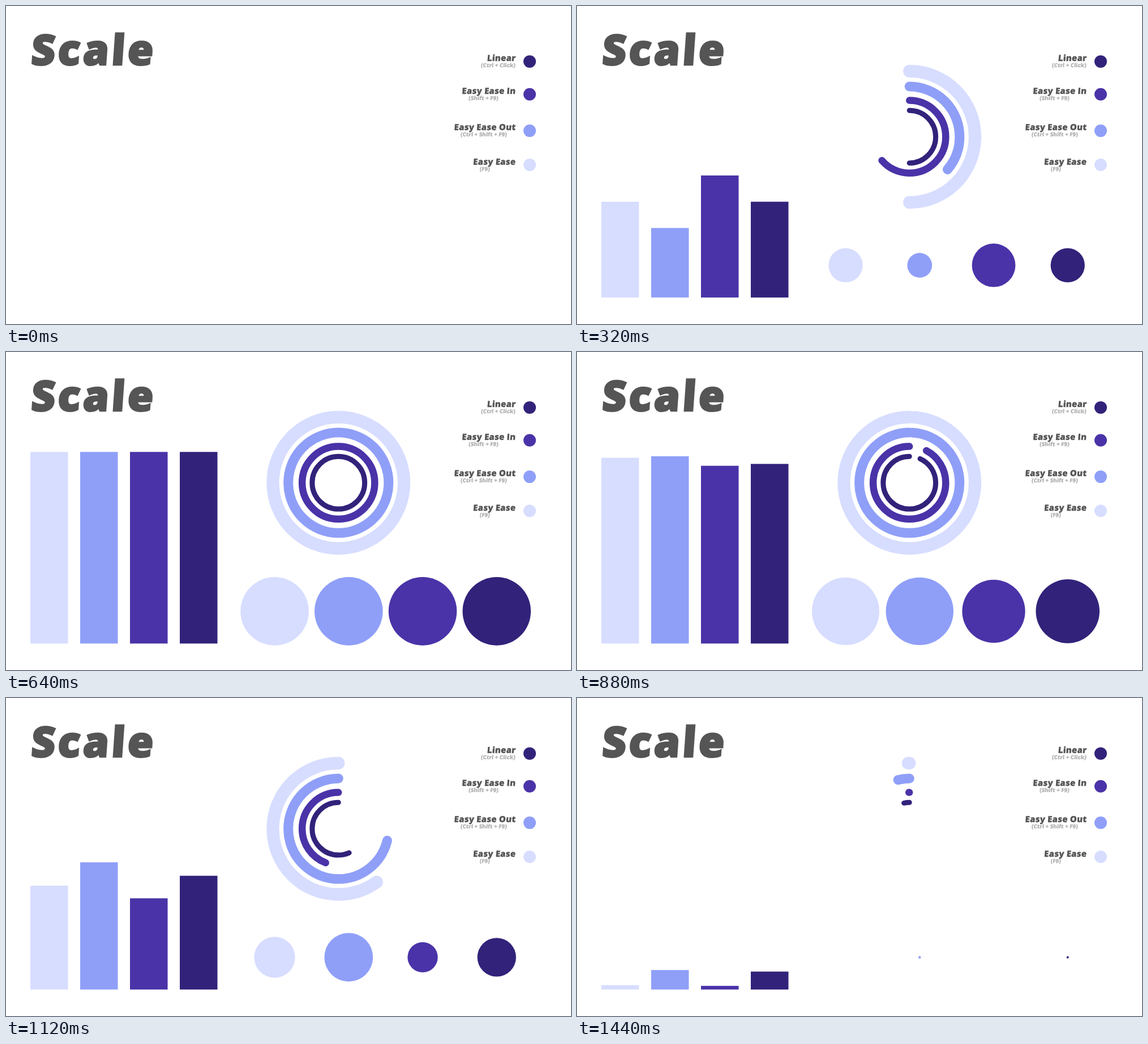
Write an HTML page that moves like this. It is 998x561 px and loops after 1.48 s.

```html
<!DOCTYPE html>
<html lang="en">
<head>
<meta charset="utf-8">
<title>Scale</title>
<style>
html, body { margin: 0; width: 100%; height: 100%; overflow: hidden; background: #fff; }
svg { display: block; width: 998px; height: 561px; }
text { font-family: "Open Sans", sans-serif; font-weight: 800; fill: #555; stroke: #555; }
.end { text-anchor: end; }
.title { font-size: 74px; letter-spacing: 4.4px; stroke-width: 2.6px; }
.name { font-size: 15px; letter-spacing: 0.2px; stroke-width: 0.3px; }
.keys { font-size: 9.8px; fill: #b5b5b5; stroke: #b5b5b5; stroke-width: 0.2px; }
</style>
</head>
<body>
<svg id="stage" viewBox="0 0 998 561"></svg>
<script>
const stage = document.getElementById('stage');
const LOOP = 1480, STEP = 40;
const BASE = 514.3, BAR_H = 338, DOT_R = 60.3;

function add(tag, attrs, content = '') {
  const el = document.createElementNS('http://www.w3.org/2000/svg', tag);
  for (const k in attrs) el.setAttribute(k, attrs[k]);
  el.textContent = content;
  stage.append(el);
  return el;
}

function label(cls, x, y, content) {
  add('text', { class: cls, transform: `translate(${x} ${y}) skewX(-4)` }, content);
}

const clamp = x => Math.min(1, Math.max(0, x));

// Cubic Bezier easing, solved by bisection
function bezier(x1, y1, x2, y2) {
  const at = (a, b, s) => 3 * (1 - s) ** 2 * s * a + 3 * (1 - s) * s * s * b + s ** 3;
  return u => {
    if (u <= 0 || u >= 1) return clamp(u);
    let lo = 0, hi = 1;
    for (let i = 0; i < 30; i++) {
      const mid = (lo + hi) / 2;
      if (at(x1, x2, mid) < u) lo = mid; else hi = mid;
    }
    return at(y1, y2, lo);
  };
}

const T = 1 / 3, S = 1 / 6;
const linear = u => clamp(u);
const easeIn = bezier(S, S, 1 - T, 1);
const easeOut = bezier(T, 0, 1 - S, 1 - S);
const easeBoth = bezier(T, 0, 1 - T, 1);

// drop: easing of the falling bar
const series = [
  { color: '#d7ddff', ease: easeBoth, drop: bezier(S, 0, 1 - T, 1), r: 115.8, w: 22.3,
    y: 280.3, name: 'Easy Ease', keys: '(F9)', keysX: 854.5 },
  { color: '#8f9ff8', ease: easeOut, drop: bezier(S, 0, 1 - S, 1 - S), r: 88.6, w: 17,
    y: 220.1, name: 'Easy Ease Out', keys: '(Ctrl + Shift + F9)', keysX: 884.5 },
  { color: '#4a33a8', ease: easeIn, drop: easeIn, r: 64.1, w: 12.5,
    y: 155.8, name: 'Easy Ease In', keys: '(Shift + F9)', keysX: 869.5 },
  { color: '#32227a', ease: linear, drop: linear, r: 46.4, w: 9,
    y: 97.9, name: 'Linear', keys: '(Ctrl + Click)', keysX: 899.5 }
];

label('title', 43, 104.2, 'Scale');
series.forEach((s, i) => {
  const fill = s.color;
  add('circle', { cx: 925, cy: s.y, r: 11, fill });
  label('name end', 900, s.y - 0.8, s.name);
  label('keys end', s.keysX, s.y + 10.2, s.keys);
  s.bar = add('rect', { x: 43 + 88 * i, width: 66.5, fill });
  s.dot = add('circle', { cx: 474.5 + 130.75 * i, cy: 457.4, fill });
  s.arc = add('circle', {
    r: s.r, fill: 'none', stroke: fill, 'stroke-width': s.w, 'stroke-linecap': 'round',
    pathLength: 1, transform: 'translate(587.2 230.7) rotate(-90)'
  });
});

function draw(t) {
  const rise = (t - 20) / 600;
  const falling = t > 840;
  const fall = t - 840 - 20 * clamp((t - 880) / 240);
  for (const s of series) {
    const size = falling ? 1 - s.ease(fall / 600) : s.ease(rise);
    const h = BAR_H * (falling ? 1 - s.drop(fall / 640) : s.ease(rise));
    s.bar.setAttribute('y', BASE - h);
    s.bar.setAttribute('height', h);
    s.dot.setAttribute('r', DOT_R * size);
    s.arc.setAttribute('visibility', size > 0 ? 'visible' : 'hidden');
    s.arc.setAttribute('stroke-dasharray', `${size} 2`);
    s.arc.setAttribute('stroke-dashoffset', falling ? size - 1 : 0);
  }
}

function frame() {
  const t = performance.now() % LOOP;
  draw(Math.floor(t / STEP) * STEP);
  requestAnimationFrame(frame);
}
frame();
</script>
</body>
</html>
```
